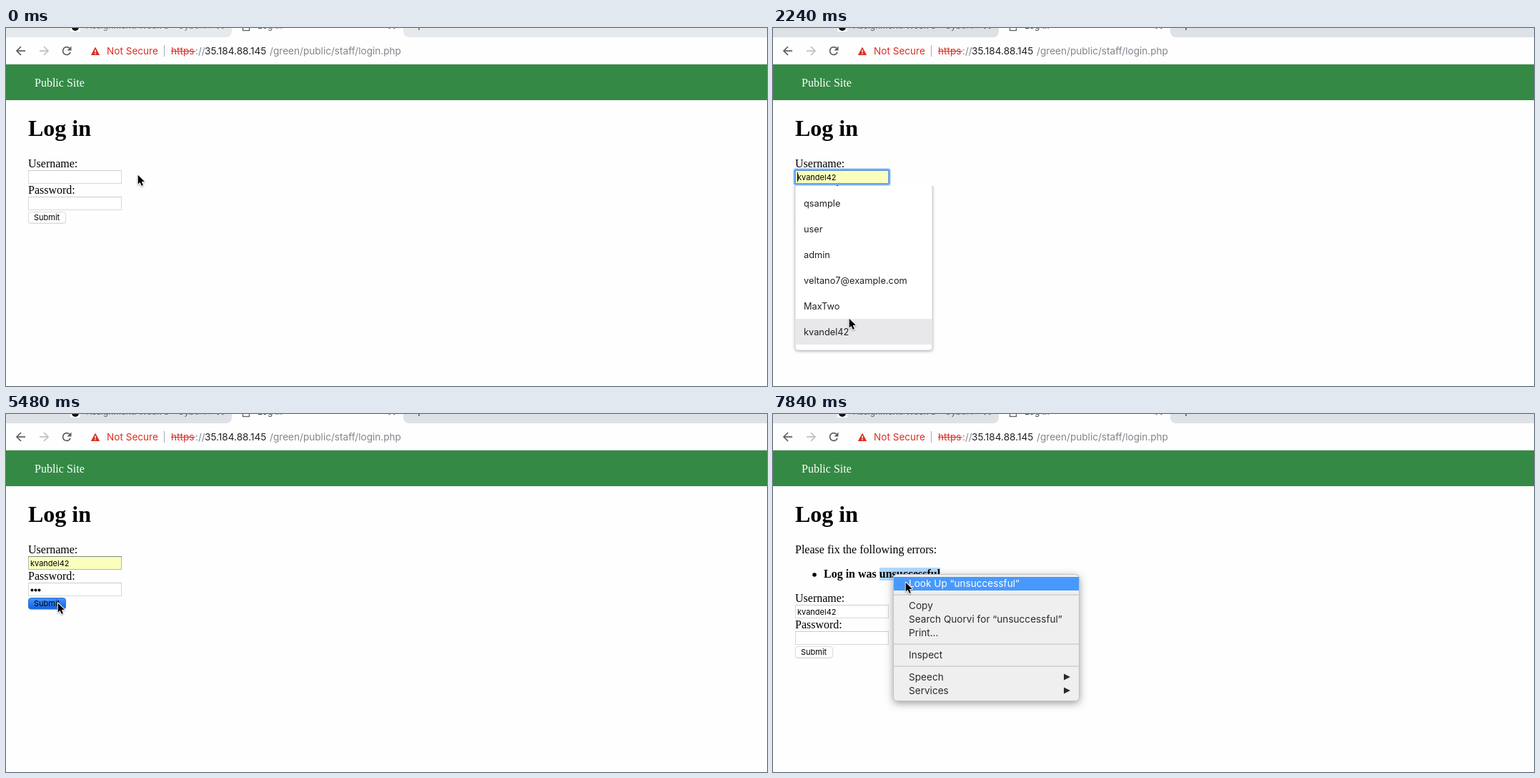
Write an HTML page with a canvas that moves like this. It is 1065 px wide and 501 px high and loops after 7.99 s.

```html
<!DOCTYPE html>
<html lang="en">
<head>
<meta charset="utf-8">
<title>Log in</title>
<style>
html, body { margin: 0; width: 100%; height: 100%; overflow: hidden; background: #fefefe; }
canvas { display: block; }
</style>
</head>
<body>
<canvas id="stage" width="1065" height="501"></canvas>
<script>
const ctx = document.getElementById('stage').getContext('2d');
const LOOP = 7990;
const SANS = 'Inter, Roboto, sans-serif';
const SERIF = '"Liberation Serif", "Noto Serif", serif';
const USERS = ['qsample', 'user', 'admin', 'veltano7@example.com', 'MaxTwo', 'kvandel42'];
const PICK = USERS[5];

// Pointer moves: start, end, steps, target x, target y
const START = [184, 205];
const MOVES = [
  [150, 1050, 7, 47, 208],
  [1800, 1940, 2, 108, 389],
  [2090, 2380, 3, 105, 414],
  [2830, 3710, 7, 106, 242],
  [5050, 5340, 3, 72, 264],
  [6070, 6800, 6, 165, 226],
  [7840, 7840, 1, 185, 235]
];

function pointerAt(t) {
  let [x, y] = START;
  for (const [t0, t1, steps, tx, ty] of MOVES) {
    if (t < t0) break;
    const part = t >= t1 ? 1 : (Math.floor((t - t0) / (t1 - t0) * (steps - 1) + 0.01) + 1) / steps;
    x += (tx - x) * part;
    y += (ty - y) * part;
  }
  return [Math.round(x), Math.round(y)];
}

function text(str, x, y, size, color, family = SANS, weight = 400) {
  ctx.font = `${weight} ${size}px ${family}`;
  ctx.fillStyle = color;
  ctx.fillText(str, x, y);
}

function rect(x, y, w, h, color) {
  ctx.fillStyle = color;
  ctx.fillRect(x, y, w, h);
}

function round(x, y, w, h, r) {
  ctx.beginPath();
  ctx.roundRect(x, y, w, h, r);
}

function poly(points, color) {
  ctx.beginPath();
  points.forEach(([x, y]) => ctx.lineTo(x, y));
  ctx.closePath();
  ctx.fillStyle = color;
  ctx.fill();
}

function line(points, color, width) {
  ctx.beginPath();
  points.forEach(([x, y]) => ctx.lineTo(x, y));
  ctx.strokeStyle = color;
  ctx.lineWidth = width;
  ctx.stroke();
}

function dot(x, y, r, color) {
  ctx.beginPath();
  ctx.arc(x, y, r, 0, Math.PI * 2);
  ctx.fillStyle = color;
  ctx.fill();
}

function cross(x, y, r, color, width) {
  line([[x - r, y - r], [x + r, y + r]], color, width);
  line([[x - r, y + r], [x + r, y - r]], color, width);
}

function shadowed(blur, dy, alpha, color, border) {
  ctx.save();
  ctx.shadowColor = `rgba(0,0,0,${alpha})`;
  ctx.shadowBlur = blur;
  ctx.shadowOffsetY = dy;
  ctx.fillStyle = color;
  ctx.fill();
  ctx.restore();
  ctx.strokeStyle = border;
  ctx.lineWidth = 1;
  ctx.stroke();
}

function drawTabs(active, loading) {
  const strip = active ? '#dee1e6' : '#e7eaed';
  const ink = active ? '#5f6368' : '#777b80';
  ctx.fillStyle = strip;
  round(-10, -10, 326, 23, [0, 0, 8, 0]);
  ctx.fill();
  round(556, -10, 520, 23, [0, 0, 0, 8]);
  ctx.fill();

  rect(90, -8, 14, 13, '#fff');
  dot(97, -1, 5, '#111');
  const fade = ctx.createLinearGradient(262, 0, 290, 0);
  fade.addColorStop(0, ink);
  fade.addColorStop(1, strip);
  text('Assignment: Week 8 - Cyberse', 112, 1, 12, fade);
  cross(300, -3, 4, ink, 1.5);

  if (loading) {
    ctx.beginPath();
    ctx.arc(336, -2, 6, 0, Math.PI * 1.4);
    ctx.strokeStyle = '#5f6368';
    ctx.lineWidth = 2;
    ctx.stroke();
  } else {
    ctx.strokeStyle = '#5f6368';
    ctx.lineWidth = 1.3;
    ctx.strokeRect(331.5, -8.5, 9, 12);
  }
  text('Log in', 352, 1, 12, active ? '#3c4043' : '#55595e');
  cross(540, -3, 4, '#5f6368', 1.5);
  line([[578, -8], [578, 3]], ink, 1.7);
}

function drawArrow(x, dir, color) {
  line([[x - 6 * dir, 32], [x + 6 * dir, 32]], color, 1.7);
  line([[x, 26], [x + 6 * dir, 32], [x, 38]], color, 1.7);
}

function drawToolbar(loading) {
  drawArrow(21, -1, '#5a5d61');
  drawArrow(53, 1, '#bdbfc3');
  if (loading) {
    cross(85, 32, 5, '#5a5d61', 1.8);
  } else {
    ctx.beginPath();
    ctx.arc(85, 32, 5.4, 0.35, Math.PI * 1.75);
    ctx.strokeStyle = '#5a5d61';
    ctx.lineWidth = 1.7;
    ctx.stroke();
    poly([[91.5, 25.5], [91.5, 31.5], [85.5, 31.5]], '#5a5d61');
  }
  poly([[125, 26.5], [131.2, 38], [118.8, 38]], '#d93025');
  rect(124.3, 30.5, 1.5, 3.6, '#fff');
  rect(124.3, 35, 1.5, 1.5, '#fff');
  text('Not Secure', 141, 37, 13.6, '#d93025');
  rect(221, 24, 1, 16, '#a9a9ad');

  text('https', 231, 37, 13.6, '#d93025');
  rect(231, 32, 34, 1, '#d93025');
  text('://', 265, 37, 13.6, '#80868b');
  text('35.184.88.145', 278, 37, 13.6, '#202124');
  text('/green/public/staff/login.php', 369, 37, 13.6, '#80868b');
  rect(0, 50, 1065, 1, '#e3e5e3');
}

function drawField(y, { value = '', filled, focus }) {
  rect(31, y, 131, 19, filled ? '#faffbd' : '#fff');
  ctx.lineWidth = 1;
  ctx.strokeStyle = filled ? '#b5b5b0' : '#d8d8d8';
  ctx.strokeRect(31.5, y + 0.5, 130, 18);
  rect(31, y, 131, 1, filled ? '#85857f' : '#cbcbcb');
  if (focus) {
    round(30, y - 1, 133, 21, 2);
    ctx.strokeStyle = 'rgba(94,160,248,0.4)';
    ctx.lineWidth = 4;
    ctx.stroke();
    round(30.5, y - 0.5, 132, 20, 1.5);
    ctx.strokeStyle = '#5b9df5';
    ctx.lineWidth = 2;
    ctx.stroke();
  }
  text(value, 34, y + 14, 11, '#000');
}

function drawButton(y, pressed) {
  round(31.5, y + 0.5, 52, 15.5, 3.5);
  if (pressed) {
    const blue = ctx.createLinearGradient(0, y, 0, y + 16);
    blue.addColorStop(0, '#4a97fb');
    blue.addColorStop(1, '#0f63e3');
    shadowed(1, 0.5, 0.2, blue, '#2a74e4');
  } else {
    shadowed(1, 0.5, 0.25, '#fff', '#dcdcdc');
  }
  text('Submit', 39, y + 12, 11, '#000');
}

function drawForm(t, dy) {
  const loaded = dy > 0;
  const listOpen = t >= 1500 && t < 2680;
  const hover = hovered(t);
  const picked = t >= 2680;
  const userFocus = t >= 1500 && t < 3710;
  const passFocus = t >= 3850 && t < 5480;
  const value = picked ? PICK : hover >= 0 ? USERS[hover] : '';

  text('Username:', 31, 195 + dy, 16, '#000', SERIF);
  drawField(199 + dy, { value, filled: !loaded && value !== '', focus: userFocus });
  text('Password:', 31, 232 + dy, 16, '#000', SERIF);
  drawField(236 + dy, { focus: passFocus });
  drawButton(257 + dy, !loaded && t >= 5480);
  if (loaded) return;

  const dots = t < 4750 ? 0 : t < 4900 ? 1 : 3;
  for (let i = 0; i < dots; i++) dot(36.5 + i * 5, 246.5, 2, '#000');

  if (listOpen) rect(34, 202, 1, 13, '#000');
  if (picked && userFocus) {
    ctx.font = `11px ${SANS}`;
    const w = ctx.measureText(PICK).width;
    for (let x = 35; x < 34 + w; x += 3) dot(x, 214.5, 0.9, '#e8402f');
    rect(35 + Math.round(w), 202, 1, 13, '#000');
  }
  const caretOn = t < 4450 || t >= 4750;
  if (passFocus && caretOn) rect(34 + (dots ? dots * 5 + 1 : 0), 239, 1, 13, '#000');
}

function hovered(t) {
  if (t < 1800 || t >= 2680) return -1;
  return t < 1940 ? 1 : t < 2090 ? 3 : t < 2240 ? 4 : 5;
}

function drawList(t) {
  ctx.save();
  ctx.beginPath();
  ctx.rect(20, 221, 230, 250);
  ctx.clip();
  round(31, 215, 192, 236, 4);
  shadowed(4, 1, 0.35, '#fff', '#d2d2d2');
  ctx.restore();
  USERS.forEach((name, i) => {
    const y = 227 + i * 36;
    if (i === hovered(t)) rect(31, y, 192, 36, '#e8e8eb');
    text(name, 43, y + 23, 12.8, '#202124');
  });
}

function drawError(t) {
  text('Please fix the following errors:', 31, 195, 16, '#000', SERIF);
  dot(58, 225, 2.8, '#000');
  if (t >= 7090) rect(149, 215, 85, 18, '#b2d7fe');
  text('Log in was unsuccessful.', 71, 229, 16, '#000', SERIF, 700);
}

function drawMenu(t) {
  round(168.5, 224.5, 260, 177, 5);
  shadowed(12, 3, 0.4, '#efefef', '#c2c2c2');
  const lit = t >= 7840;
  if (lit) rect(169, 228, 259, 19, '#4799fd');
  const rows = [
    ['Look Up “unsuccessful”', 242], ['Copy', 273], ['Search Quorvi for “unsuccessful”', 292],
    ['Print...', 311], ['Inspect', 342], ['Speech', 373], ['Services', 392]
  ];
  rows.forEach(([label, y], i) => text(label, 190, y, 13.6, lit && i === 0 ? '#fff' : '#2b2b2b'));
  for (const y of [252, 321, 352]) rect(169, y, 259, 2, '#d6d6d6');
  for (const y of [368, 387]) poly([[407, y - 4.5], [416, y], [407, y + 4.5]], '#2b2b2b');
}

function drawPointer(t, loaded) {
  const [x, y] = pointerAt(t);
  const within = (x0, y0, w, h) => x >= x0 && x <= x0 + w && y >= y0 && y <= y0 + h;
  const beam = loaded
    ? t < 7390 && (within(71, 215, 168, 18) || within(31, 267, 131, 19))
    : within(31, 199, 131, 19) || (within(31, 236, 131, 19) && !(t >= 1500 && t < 2680));
  ctx.save();
  ctx.translate(x, y);
  if (beam) {
    line([[0.5, -6], [0.5, 7]], '#000', 1.2);
    line([[-3, -7.5], [-1, -7], [0.5, -6], [2, -7], [4, -7.5]], '#000', 1);
    line([[-3, 8], [-1, 7.5], [0.5, 6.5], [2, 7.5], [4, 8]], '#000', 1);
    line([[-1.5, 3], [2.5, 3]], '#000', 1);
  } else {
    const shape = [[0.7, 0.7], [0.7, 13.6], [3.6, 10.9], [5.7, 15.8], [7.9, 14.9], [5.8, 10.1], [9.8, 9.8]];
    ctx.shadowColor = 'rgba(0,0,0,0.35)';
    ctx.shadowBlur = 2;
    ctx.shadowOffsetY = 1;
    ctx.lineJoin = 'round';
    line([...shape, shape[0], shape[1]], '#fff', 2);
    ctx.shadowColor = 'transparent';
    poly(shape, '#000');
  }
  ctx.restore();
}

function draw(t) {
  const loading = t >= 5620 && t < 5920;
  const loaded = t >= 5920;
  rect(0, 0, 1065, 501, '#fefefe');
  drawTabs(t >= 900, loading);
  drawToolbar(loading);
  rect(0, 51, 1065, 50, '#348a45');
  text('Public Site', 40, 82, 16, '#fff', SERIF);
  text('Log in', 31, 151, 32, '#000', SERIF, 700);
  if (loaded) drawError(t);
  drawForm(t, loaded ? 68 : 0);
  if (t >= 1500 && t < 2680) drawList(t);
  if (t >= 7540) drawMenu(t);
  drawPointer(t, loaded);
}

const begin = performance.now();
function tick() {
  draw((performance.now() - begin) % LOOP);
  requestAnimationFrame(tick);
}
tick();
</script>
</body>
</html>
```
